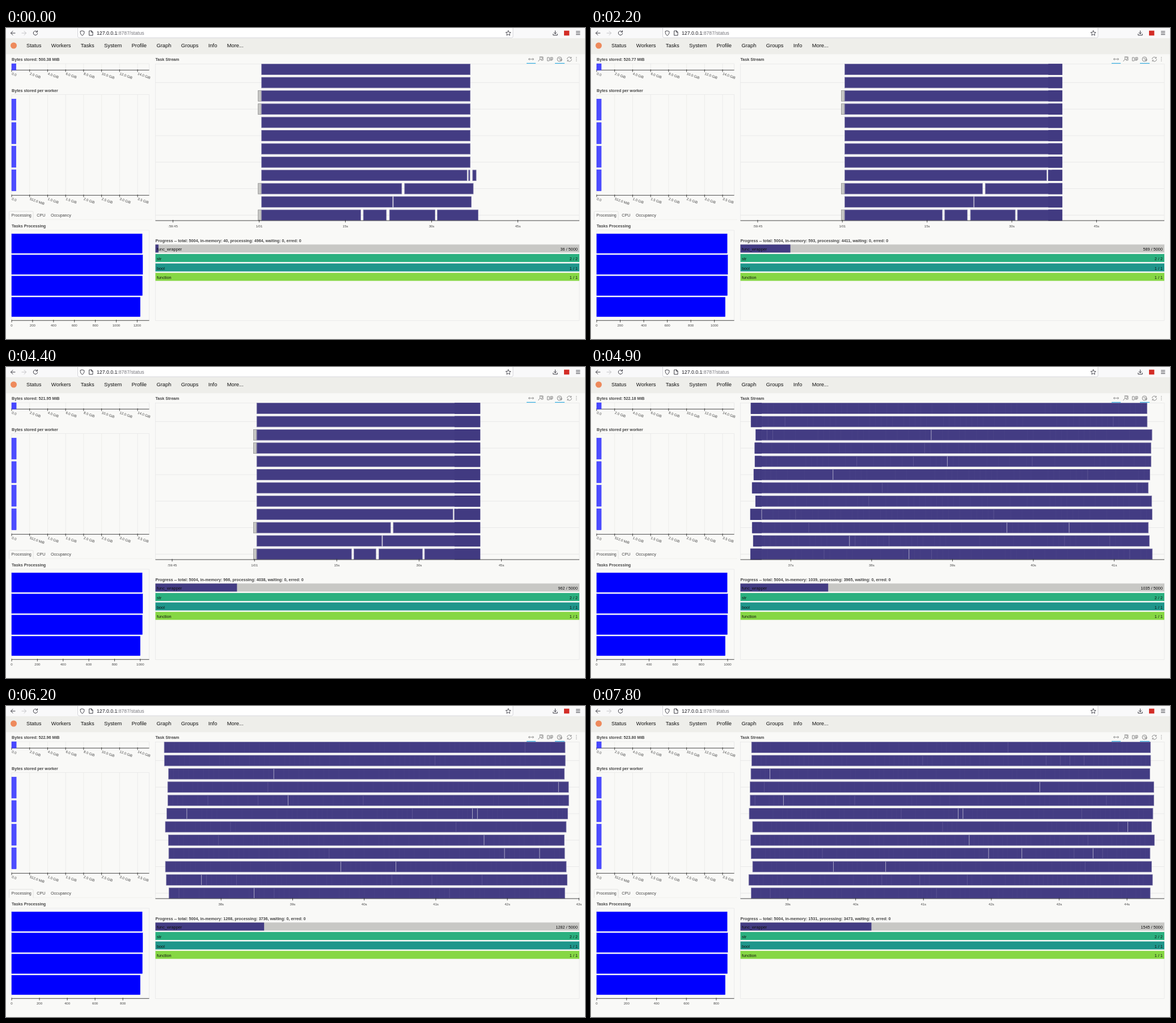
Write an HTML page that moves like this. It is 1021 px wide and 549 px high and loops after 8000 ms.

```html
<!DOCTYPE html>
<html lang="en">
<head>
<meta charset="utf-8">
<title>Status</title>
<style>
html, body { margin: 0; width: 100%; height: 100%; overflow: hidden; background: #f9f9f7; }
svg { display: block; width: 1021px; height: 549px; font-family: 'Liberation Sans', Arial, sans-serif; }
.title { font-size: 7.15px; font-weight: bold; fill: #444; }
.nav { font-size: 9.33px; fill: #111; }
.tab { font-size: 7.15px; fill: #444; }
.tick { font-size: 6.05px; fill: #444; }
.bar { font-size: 7.3px; fill: #111; }
.icon { fill: none; stroke: #3c3c44; stroke-width: 1; stroke-linecap: round; stroke-linejoin: round; }
.tool { fill: none; stroke: #8d8d8d; stroke-width: 1; }
</style>
</head>
<body>
<svg viewBox="0 0 1021 549">
  <g id="still"></g>
  <g id="live"></g>
</svg>
<script>
const LOOP = 8000;
const IDLE_STEPS = [31, 33, 40, 71, 74, 79];
const ZOOM_AT = 4.9;
const LEFT = 263.5, RIGHT = 1011, WIDTH = RIGHT - LEFT;
const TASK = '#433c83', TASK_EDGE = '#827dab', GRID = '#e5e5e5';
const ROWS = 12, ROW_H = 18.8;
const SHORT_TASKS_FROM = 36.46, TASK_TIME = .07;

// [seconds, value] key points
const finished = [[0, 36], [1.4, 439], [3, 738], [4.4, 962], [4.9, 1035], [6.2, 1282], [7.8, 1545]];
const zoomFrom = [[4.9, 36.377], [6.2, 37.083], [7.8, 38.302]];
const zoomTo = [[4.9, 41.62], [6.2, 43.005], [7.8, 44.55]];

// The last worker's rows: [middle, length] of each pause, and where the first tasks end
const slowRows = {
  8: { pauses: [[36.3, .27], [36.9, .48]], end: 37.75 },
  9: { pauses: [[25.05, .5]], end: 37.25 },
  10: { pauses: [[23.28, .15]], end: 36.9 },
  11: { pauses: [[17.9, .45], [22.4, .55], [30.8, .4]], end: 38.1 }
};
const workerLoad = [.996, 1, .997, .981];

const at = (points, t) => {
  let i = 0;
  while (i < points.length - 2 && t > points[i + 1][0]) i++;
  const [[t0, v0], [t1, v1]] = points.slice(i, i + 2);
  return v0 + (v1 - v0) * (t - t0) / (t1 - t0);
};
const tasksDone = t => Math.round(at(finished, t));
const tasksInMemory = t => tasksDone(t) + (t <= ZOOM_AT ? 4 : -14);
const latestTask = t => 36.72 + t;
const noise = n => { const v = Math.sin(n * 127.1) * 43758.5453; return v - Math.floor(v); };

const n2 = v => +v.toFixed(2);
const rect = (x, y, w, h, fill, more = '') =>
  `<rect x="${n2(x)}" y="${n2(y)}" width="${n2(Math.max(0, w))}" height="${n2(h)}" fill="${fill}" ${more}/>`;
const line = (x1, y1, x2, y2, color, w = 1) =>
  `<path d="M${n2(x1)} ${n2(y1)}L${n2(x2)} ${n2(y2)}" stroke="${color}" stroke-width="${w}" fill="none"/>`;
const text = (x, y, cls, s, more = '') => `<text x="${n2(x)}" y="${n2(y)}" class="${cls}" ${more}>${s}</text>`;
const path = (d, cls, more = '') => `<path d="${d}" class="${cls}" ${more}/>`;
const frame = (x, y, w, h) => rect(x, y, w, h, 'none', `stroke="${GRID}" stroke-width=".7"`);
const tick = (x, y) => line(x, y - 1.2, x, y + 3.3, '#222', .8);
const middle = 'text-anchor="middle"';
const rowTop = i => 63.6 + 23.4 * i;

function browserChrome() {
  return rect(0, 0, 1021, 18, '#f9f9fa') +
    rect(126.5, -3, 767.5, 20.2, '#fff', 'rx="2.5" stroke="#c9c9d0" stroke-width=".8"') +
    path('M16 9H8.5M12 5.5L8.5 9L12 12.5', 'icon') +
    path('M28 9H35.5M32 5.5L35.5 9L32 12.5', 'icon', 'style="stroke:#c3c3c6"') +
    path('M55 6.8A3.7 3.7 0 1 0 55.6 9.6M55.4 4.6V7.2H52.8', 'icon') +
    path('M134.5 5L138 6.2C138 9.8 137 12 134.5 13.3C132 12 131 9.8 131 6.2Z', 'icon') +
    path('M147 5H150.8L153 7.2V13H147ZM150.6 5V7.4H153', 'icon') +
    text(160, 12.2, '', '<tspan fill="#18181f">127.0.0.1</tspan><tspan fill="#77777d">:8787/status</tspan>', 'font-size="8.7"') +
    path('M885.7 4.6L887 7.5L890.2 7.8L887.8 9.9L888.5 13L885.7 11.4L882.9 13L883.6 9.9L881.2 7.8L884.4 7.5Z', 'icon', 'style="stroke-width:.9"') +
    path('M968.5 5V10.2M966.2 8L968.5 10.3L970.8 8M964.8 10.5V12.7H972.2V10.5', 'icon') +
    rect(984, 4.7, 9.3, 8.6, '#d32d27') +
    path('M1005.5 6H1012M1005.5 8.8H1012M1005.5 11.6H1012', 'icon');
}

function navBar() {
  const items = ['Status', 'Workers', 'Tasks', 'System', 'Profile', 'Graph', 'Groups', 'Info', 'More...'];
  return rect(0, 18, 1021, 28.3, '#eeeeea') + '<circle cx="13.5" cy="31" r="5.5" fill="#ee8a5c"/>' +
    text(36, 34.2, 'nav', items.map((s, i) => `<tspan dx="${i ? 17.4 : 0}">${s}</tspan>`).join(''));
}

function byteAxis(top, y, label) {
  let s = frame(10, top, 242.5, y - top);
  for (let i = 0; i < 8; i++) {
    const x = 10 + 31.72 * i;
    if (i) s += line(x, top, x, y, '#e9e9e8', .8);
    s += tick(x, y) + text(x - .3, y + 8, 'tick', i ? label(i) : '0.0', `transform="rotate(20 ${n2(x)} ${y + 8})"`);
  }
  return s + line(10, y, 252.5, y, '#222', .8);
}

function toolbar() {
  return path('M921.5 55H930.5M923.5 53L921.5 55L923.5 57M928.5 53L930.5 55L928.5 57', 'tool') +
    path('M940.5 51H947V57H943M942 54.5L938.5 59', 'tool') + '<circle cx="943.5" cy="53.5" r="2.2" class="tool"/>' +
    path('M954.5 52H958V58H954.5ZM962 58V52.5M960 58V52H964V56H960', 'tool') +
    '<circle cx="976" cy="55" r="4" class="tool"/>' + path('M974 54H978M976 56.5H981M979 54V59', 'tool') +
    path('M989.5 55A3.8 3.8 0 0 1 996.5 53M997.3 55A3.8 3.8 0 0 1 990.3 57.3M996.8 51V53.4H994.4M990 59.2V56.8H992.4', 'tool') +
    [52, 55, 58].map(y => rect(1005.2, y - .6, 1.2, 1.2, '#8d8d8d')).join('') +
    rect(918, 61.8, 16, 1.1, '#26aae1') + rect(968, 61.8, 17, 1.1, '#26aae1');
}

function tabs() {
  return line(48, 338.3, 258, 338.3, '#ececea', .7) +
    path('M5.5 338.5V325.5Q5.5 323.5 7.5 323.5H46Q48 323.5 48 325.5V338.5', '', 'fill="none" stroke="#dededc" stroke-width=".8"') +
    text(9.5, 333, 'tab', 'Processing') + text(54.3, 333, 'tab', 'CPU') + text(79, 333, 'tab', 'Occupancy');
}

function still() {
  const gib = v => v.toFixed(1) + ' GiB';
  let s = rect(0, 0, 1021, 549, '#f9f9f7') + browserChrome() + navBar() +
    byteAxis(63, 74.3, i => gib(2 * i)) +
    byteAxis(117.5, 295.3, i => i === 1 ? '512.0 MiB' : gib(i / 2)) +
    text(10, 113, 'title', 'Bytes stored per worker') + tabs() +
    text(10, 352.4, 'title', 'Tasks Processing') + frame(10, 357, 242.5, 159.3) +
    text(LEFT, 58.3, 'title', 'Task Stream') + toolbar() + frame(LEFT, 63.5, WIDTH, 276.5);
  for (let i = 1; i < ROWS; i += 2) s += line(LEFT, rowTop(i) + 9.4, RIGHT, rowTop(i) + 9.4, GRID, .8);
  return s + frame(LEFT, 382, WIDTH, 134.5);
}

function bytes(t) {
  const mib = Math.min(500.38 + t * 37.6, 520.29 + (tasksDone(t) - 439) * .00317);
  const w = mib / 1024 * 15.86;
  const edge = 'stroke="#3535ff" stroke-width=".5"';
  let s = text(10, 58.3, 'title', `Bytes stored: ${mib.toFixed(2)} MiB`) + rect(10, 63, w, 11.2, '#4848ff', edge);
  for (let i = 0; i < 4; i++) s += rect(10, 125.3 + 41.6 * i, w, 37.5, '#4d4dff', edge);
  return s;
}

function tasksProcessing(t) {
  const longest = (5004 - tasksInMemory(t)) / 4 * 1.009;
  const scale = 231 / longest;
  let s = workerLoad.map((load, i) =>
    rect(10, 363.3 + 37.3 * i, 231 * load, 34.3, '#00f', 'stroke="#00f" stroke-width=".5"')).join('');
  s += line(10, 516.3, 252.5, 516.3, '#222', .8);
  for (let v = 0; v * scale <= 242.5; v += 200)
    s += tick(10 + v * scale, 516.3) + text(10 + v * scale, 527, 'tick', v, middle);
  return s;
}

function progress(t) {
  const n = tasksDone(t), mem = tasksInMemory(t);
  const rows = [['func_wrapper', n, 5000, '#c8c8c5'], ['str', 2, 2, '#2bb07f'],
    ['bool', 1, 1, '#1f968b'], ['function', 1, 1, '#86d744']];
  const title = `Progress -- total: 5004, in-memory: ${mem}, processing: ${5004 - mem}, waiting: 0, erred: 0`;
  return text(LEFT, 378.2, 'title', title) + rows.map(([name, k, total, color], i) => {
    const y = 382.3 + 16.65 * i;
    return rect(LEFT, y, WIDTH, 14.1, color) +
      (k < total ? rect(LEFT, y, WIDTH * k / total, 14.1, TASK) : '') +
      text(266, y + 11.1, 'bar', name) + text(1008, y + 11.1, 'bar', `${k} / ${total}`, 'text-anchor="end"');
  }).join('');
}

const taskBar = (x1, x2, y) =>
  rect(x1, y, x2 - x1, ROW_H, TASK, `stroke="${TASK_EDGE}" stroke-width=".8"`);
const denseBar = (x1, x2, y) => rect(x1, y - .4, x2 - x1, ROW_H + .8, '#413a81');

function overviewRow(i, t, x) {
  const y = rowTop(i), now = latestTask(t);
  const { pauses, end } = slowRows[i] || { pauses: [], end: now };
  let s = '', from = .42;
  if ([2, 3, 9, 11].includes(i))
    s += rect(x(-.18), y, x(.36) - x(-.18), ROW_H, '#c6c6c4', 'stroke="#8f8f8f" stroke-width=".8"');
  for (const [mid, length] of pauses) {
    s += taskBar(x(from), x(mid - length / 2), y);
    from = mid + length / 2;
  }
  s += taskBar(x(from), x(Math.max(end, now)), y);
  return t ? s + denseBar(x(SHORT_TASKS_FROM), x(now), y) : s;
}

function zoomRow(i, x, from, to) {
  const y = rowTop(i), phase = noise(i + 5);
  const first = Math.ceil((from + .12) / TASK_TIME - phase);
  const last = Math.floor((to - .145) / TASK_TIME - phase);
  const taskX = k => x((k + phase) * TASK_TIME);
  let s = taskBar(taskX(first), taskX(last), y), seams = '';
  if (x(36.64) > taskX(first)) s += denseBar(taskX(first), x(36.64), y);
  for (let k = first + 1; k < last; k++) {
    const pause = noise(k + i * 61.7), gx = taskX(k);
    if (pause > .99) s += line(gx, y + .4, gx, y + ROW_H - .4, '#aaa7c6', 1);
    else if (pause > .96) s += line(gx, y + .4, gx, y + ROW_H - .4, '#615a97', .8);
    else if (pause > .4) seams += `M${n2(gx)} ${n2(y + .5)}v18`;
  }
  return s + `<path d="${seams}" stroke="#8780ad" stroke-width=".6" opacity=".12"/>`;
}

function taskStream(t) {
  const zoomed = t >= ZOOM_AT;
  const from = zoomed ? at(zoomFrom, t) : -18.05;
  const to = zoomed ? at(zoomTo, t) : Math.max(55.7, 54.8 + t);
  const x = time => LEFT + (time - from) / (to - from) * WIDTH;
  let s = '';
  for (let i = 0; i < ROWS; i++) s += zoomed ? zoomRow(i, x, from, to) : overviewRow(i, t, x);
  s += line(LEFT, 340, RIGHT, 340, '#222', .8);
  const step = zoomed ? 1 : 15;
  for (let v = Math.ceil(from / step) * step; v <= to; v += step) {
    const label = v < 0 ? ':59:45' : v === 0 ? '1/01' : v + 's';
    s += tick(x(v), 340) + text(x(v), 352.2, 'tick', label, middle);
  }
  return s;
}

const live = document.getElementById('live');
document.getElementById('still').innerHTML = still();
const started = performance.now();
let shown = -1;

function update() {
  let step = Math.floor((performance.now() - started) % LOOP / 100);
  if (IDLE_STEPS.includes(step)) step--;
  if (step !== shown) {
    shown = step;
    const t = step / 10;
    live.innerHTML = bytes(t) + tasksProcessing(t) + taskStream(t) + progress(t);
  }
  requestAnimationFrame(update);
}
update();
</script>
</body>
</html>
```
